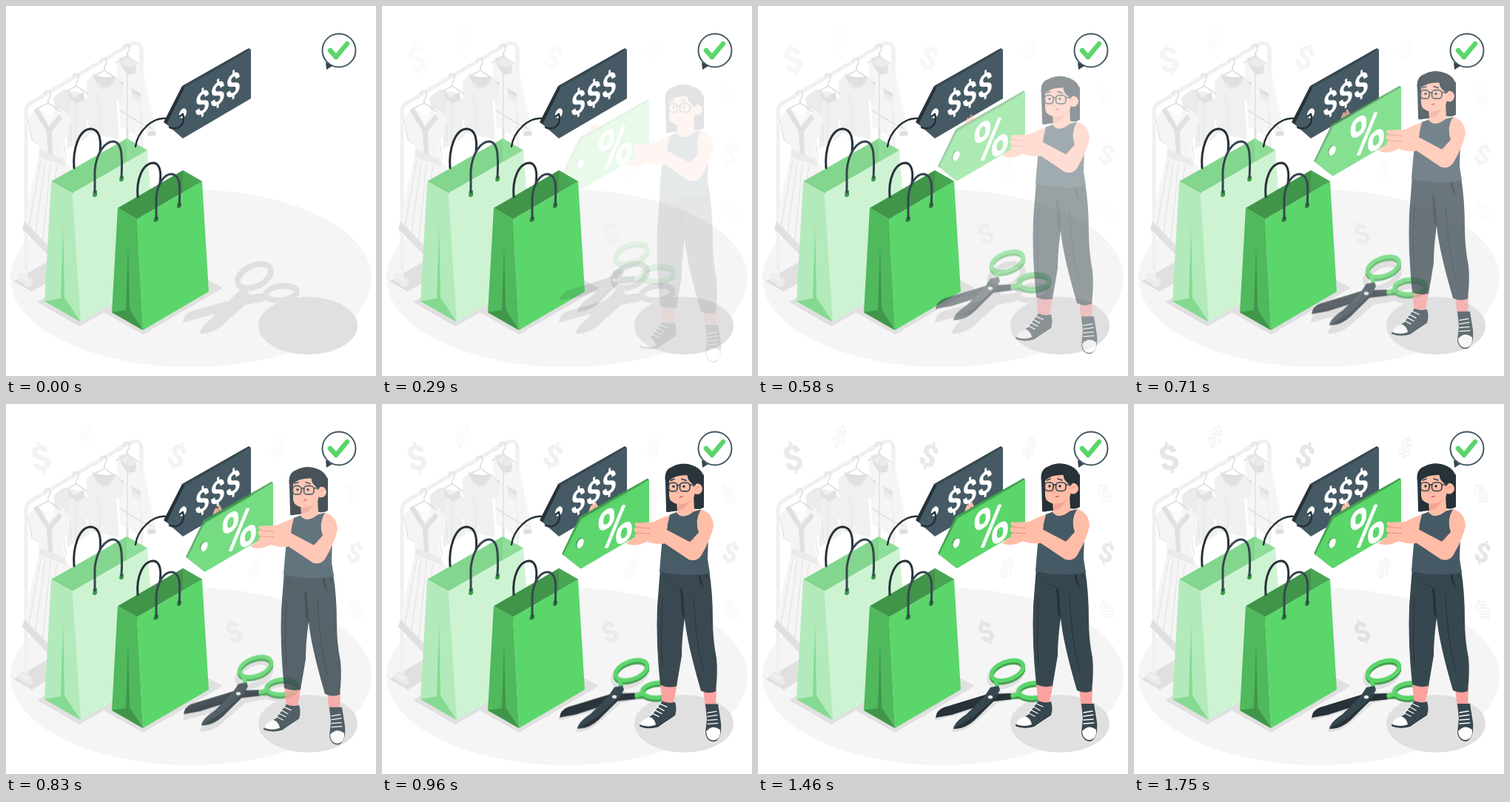
Write an HTML page that moves like this. It is 500x500 px and loops after 1.79 s.

```html
<!DOCTYPE html>
<html lang="en">
<head>
<meta charset="utf-8">
<title>Price drop</title>
<style>
html, body { margin: 0; width: 100%; height: 100%; overflow: hidden; background: #fff; }
svg { display: block; width: 100vw; height: 100vh; }
text { font-family: Roboto, Arial, sans-serif; font-weight: 700; text-anchor: middle; }

.ink { fill: #263238; }
.navy { fill: #37474f; }
.slate { fill: #455a64; }
.green { fill: #5bd66b; }
.skin { fill: #ffbda7; }
.white { fill: #fff; }
.g1 { fill: #fafafa; }
.g2 { fill: #f5f5f5; }
.g3 { fill: #ebebeb; }
.g4 { fill: #e0e0e0; }
.line { fill: none; stroke-linecap: round; stroke-linejoin: round; }
.cord { stroke: #263238; stroke-width: 3; }
.front { stroke: #37474f; stroke-width: 3; }
.thin { stroke: #263238; stroke-width: 1; }

#shopper, #scissors {
  --from: 30px;
  animation: slide 1500ms cubic-bezier(.36, -.01, .5, 1.38) both paused;
}
#scissors { --from: -30px; }
#coins { animation: fade 1790ms linear both paused; }
#coins text { font-weight: 900; }
@keyframes slide { from { opacity: 0; transform: translateY(var(--from)); } to { opacity: 1; transform: none; } }
@keyframes fade { from { opacity: 0; } to { opacity: 1; } }
</style>
</head>
<body>
<svg viewBox="0 0 500 500">
  <ellipse class="g2" cx="250" cy="368" rx="244" ry="120"/>

  <g id="rack">
    <path class="g4" d="M10 372L62 342V370L35 386Z"/>
    <path class="line" stroke="#e0e0e0" stroke-width="3" d="M164 66V182"/>
    <path class="line" stroke="#f0f0f0" stroke-width="5" d="M27 368V143Q27 134 35 130L166 53Q183 45 183 61V190"/>
    <path class="g3" d="M16 363L22 361L36 370V378L31 380L16 371Z"/>
    <path class="line" stroke="#f5f5f5" stroke-width="2" d="M18 364L31 372"/>

    <!-- jacket -->
    <path class="g2" d="M150 76L158 69L177 79L186 92L203 170L191 174L181 132V178L154 162Z"/>
    <path class="g3" d="M152 70L164 67L175 77L176 91L165 94L157 84Z"/>
    <path class="g4" d="M153 72Q164 90 176 80L174 92L163 92Z"/>
    <path class="g3" d="M147 97L159 104V111L147 104ZM170 111L182 118V131L170 124Z"/>
    <path class="g4" d="M170 111L182 118V123L170 117ZM147 97L159 104V107L147 101ZM191 171Q197 167 203 171L202 175L192 176Z"/>
    <path class="line" stroke="#e0e0e0" stroke-width="1.5" d="M155 142L180 157L198 166M164 80V182"/>

    <!-- tee -->
    <path fill="#f0f0f0" d="M109 101L120 91Q130 114 147 94L158 108L156 130L149 126L153 180L112 172Z"/>
    <path class="g4" d="M117 92Q131 98 147 95Q143 112 130 110Q121 104 117 92Z"/>
    <path class="line" stroke="#e6e6e6" stroke-width="1" d="M117 92Q122 113 133 112Q143 111 148 95M122 119Q130 143 126 170"/>

    <!-- blouse -->
    <path fill="#f0f0f0" d="M64 124L80 113L101 117L111 128L120 149L108 156L113 176L82 194L84 151L69 145Z"/>
    <path class="g3" d="M64 124L77 113L87 124L85 156L67 147Z"/>
    <path class="g4" d="M83 113L92 124L105 116L106 127L96 132L86 125Z"/>
    <path class="line" stroke="#e0e0e0" stroke-width="1" d="M94 130V185M86 151L88 182"/>

    <!-- dress -->
    <path class="g2" d="M29 151L43 138L58 151L72 137L88 151L83 177L77 182L78 206L88 220L70 330L55 336L22 302L44 202L45 188L34 181Z"/>
    <path class="g3" d="M45 194L80 207V217L45 204Z"/>
    <path class="g4" d="M37 141L43 137L58 163L72 147L76 152L62 169L63 201L57 199L55 169ZM22 301L25 291L58 325L56 336Z"/>
    <path class="line" stroke="#e6e6e6" stroke-width="1.5" d="M30 154L35 181L44 187M47 209L31 297M53 211L40 306M60 213L50 315M78 183L81 205M69 216L60 270"/>
    <path class="g1" d="M50 145L57 159L67 146Z"/>

    <g class="line" stroke="#e0e0e0" stroke-width="1.7">
      <path id="hanger" d="M52 119Q53 113 58 115Q63 119 57 126V131L42 139M57 131L73 142"/>
      <use href="#hanger" x="38" y="-23"/>
      <use href="#hanger" x="76" y="-44"/>
      <use href="#hanger" x="107" y="-63"/>
    </g>
  </g>

  <g id="light-bag">
    <path class="g4" d="M42 400L60 390L199 366L208 371L99 433Z"/>
    <path fill="#83d68d" d="M61 237L163 179L191 195L90 253Z"/>
    <path fill="#8edd98" d="M163 179L191 195L163 211Z"/>
    <path class="line cord" d="M92 219C90 195 98 166 115 166C126 167 129 180 127 197"/>
    <path fill="#cef3d3" d="M90 253L191 195L204 368L101 427Z"/>
    <path fill="#b3eabb" d="M61 237L90 253L101 427L52 399Z"/>
    <path fill="#85da91" d="M52 399L79 394L101 427ZM77 295L74 395L79 394Z"/>
    <path fill="#3d9a49" d="M118 249H123V256Q121 260 117 257ZM154 230H159V235Q157 239 153 236Z"/>
    <path class="line front" d="M120 252V222C122 200 133 183 145 183C155 184 158 195 156 232"/>
  </g>

  <g id="green-bag">
    <path class="g4" d="M132 414L150 403L271 369L293 381L185 444Z"/>
    <path fill="#409549" d="M151 273L239 222L265 237L177 288Z"/>
    <path fill="#48a653" d="M239 222L265 237L239 252Z"/>
    <path class="line cord" d="M178 258C176 235 184 212 200 212C209 214 210 225 208 240"/>
    <path class="green" d="M177 288L265 237L274 386L185 438Z"/>
    <path fill="#4fb95c" d="M151 273L177 288L185 438L143 414Z"/>
    <path fill="#409549" d="M143 414L167 410L185 438ZM165 323L162 411L167 410Z"/>
    <path fill="#2f7a39" d="M201 285H206V289Q204 293 199 291ZM232 266H237V270Q235 275 231 272Z"/>
    <path class="line front" d="M203 287V260C204 242 213 227 224 227C235 229 236 240 234 269"/>
  </g>

  <g id="price-tag">
    <path class="navy" d="M238 108L328 57L331 59L240 114Z"/>
    <path class="slate" d="M216 159L240 111L331 59V125L239 179Z"/>
    <path class="ink" d="M213 157L238 108L241 111L217 160Z"/>
    <ellipse class="white" cx="239" cy="145" rx="4.5" ry="7" transform="rotate(25 239 145)"/>
    <path class="line" stroke="#263238" stroke-width="2.5" d="M175 190C178 169 198 150 217 152M221 164C233 169 243 160 239 146L235 149"/>
    <text class="white" font-size="42" transform="matrix(.866 -.5 0 1 286 118.5)" y="15">$$$</text>
  </g>

  <g id="bubble">
    <path class="navy" d="M432 76L433 86L443 80Z"/>
    <circle class="white" cx="450" cy="60" r="22.5" stroke="#455a64" stroke-width="2"/>
    <path class="line" stroke="#5bd66b" stroke-width="6.5" d="M438 60L446 69L461 51"/>
  </g>

  <g id="coins"></g>

  <g id="shadows">
    <ellipse class="g4" cx="408" cy="432" rx="67" ry="39"/>
    <path class="g4" d="M239 428Q240 416 251 412L302 398L322 378L329 390L357 387L350 399L323 404L288 435Q274 444 262 443Q263 433 280 420L283 416Z"/>
    <g class="line" stroke="#e0e0e0" stroke-width="8">
      <ellipse cx="335.500" cy="365" rx="24" ry="14" transform="rotate(-26 335.500 365)"/>
      <ellipse cx="372" cy="388" rx="21" ry="9.500" transform="rotate(-7 372 388)"/>
    </g>
  </g>

  <g id="scissors">
    <path class="ink" d="M240 424Q241 414 251 410L310 392L342 391L344 399L318 402L262 420Z"/>
    <g class="line" stroke-width="5.5">
      <g stroke="#43a04f">
        <ellipse cx="337" cy="363" rx="22.500" ry="12" transform="rotate(-20 337 363)"/>
        <ellipse cx="373" cy="390" rx="21" ry="10" transform="rotate(-5 373 390)"/>
        <path d="M344 396L355 396"/>
      </g>
      <g stroke="#5bd66b">
        <ellipse cx="337" cy="360" rx="22.500" ry="12" transform="rotate(-20 337 360)"/>
        <ellipse cx="373" cy="387" rx="21" ry="10" transform="rotate(-5 373 387)"/>
        <path d="M344 394L354 391M323 381L321 373"/>
      </g>
    </g>
    <path class="navy" d="M264 439Q265 430 282 419L306 395L314 383L325 381L327 386L320 400L293 426Q279 438 264 439Z"/>
    <path class="ink" d="M264 439L291 423L320 397L320 400L293 427Q279 440 264 439Z"/>
    <ellipse cx="314" cy="396" rx="3.200" ry="2.300" fill="#ebebeb"/>
  </g>

  <g id="shopper">
    <!-- legs and shoes -->
    <path fill="#fba29f" d="M376 377H399L393 407L379 406ZM434 384H452L451 411L437 411Z"/>
    <path class="navy" d="M379 401Q388 405 396 402Q399 412 396 420Q384 428 373 436Q359 440 348 435Q348 429 365 420Z"/>
    <path class="white" d="M349 433Q349 427 361 422Q369 425 370 433Q360 437 349 433Z"/>
    <path class="line" stroke="#fff" stroke-width="1.3" d="M364 417L374 422M368 413L378 418M372 409L381 414M376 405L385 409"/>
    <path class="line thin" d="M349 435Q361 439 373 435L396 420"/>
    <path class="navy" d="M437 405H454L458 430Q460 452 449 456Q439 456 437 444L439 425Z"/>
    <path class="white" d="M438 442Q447 432 457 440Q458 453 448 454Q439 454 438 442Z"/>
    <path class="line" stroke="#fff" stroke-width="1.3" d="M440 417L452 415M440 422L453 420M440 427L453 426M440 432L454 431"/>
    <path class="navy" d="M376 222L442 224Q447 254 447 292Q447 318 452 343Q454 362 451 388Q441 392 431 387Q412 322 409 289Q405 318 405 340L398 381Q386 384 376 379Q370 323 372 273Z"/>
    <path class="ink" d="M381 234Q389 245 403 247L405 282L409 292Q408 260 406 249Q391 245 381 234ZM428 230Q428 242 435 250L430 230Z"/>
    <path class="line thin" d="M421 260Q423 315 434 360M379 262Q376 315 379 354M437 228L440 236"/>

    <!-- far arm and hair -->
    <path class="skin" d="M394 148Q377 153 365 160L342 177L330 188Q339 192 349 189L387 174Z"/>
    <path class="ink" d="M385 95L435 95L435 139Q429 143 422 141L390 145Q387 146 384 145Z"/>
    <path class="skin" d="M398 128L421 121L422 142L431 144L418 158L401 155L391 149L399 144Z"/>

    <!-- top -->
    <path class="slate" d="M389 149L398 146Q406 157 421 145L431 142Q429 159 441 179L440 209L443 228Q412 234 375 226Q377 200 379 180Q386 172 386 162Z"/>
    <path class="line thin" opacity=".35" d="M381 186Q390 192 395 200M421 211L430 220"/>

    <!-- head -->
    <path class="skin" d="M387 99Q387 91 399 89L421 95L424 110Q424 129 413 134Q399 138 390 130Q386 123 387 99Z"/>
    <path fill="#f2a38f" d="M401 135Q413 135 419 128L408 141L399 144Z"/>
    <path class="ink" d="M383 105Q380 88 393 84Q407 77 421 83Q434 88 435 101V139Q428 143 422 140L423 118L420 108Q412 102 413 96Q397 95 388 103L388 145Q385 146 384 141Z"/>
    <path class="skin" d="M421 112Q425 104 431 109Q436 116 429 121Q423 123 421 118Z"/>
    <path class="line" stroke="#e98f7c" d="M424 114L429 111M400 112L398 119L401 120"/>
    <g class="line" stroke="#37474f" stroke-width="1.700">
      <rect x="387.500" y="106" width="11.500" height="11.500" rx="4.500"/>
      <rect x="402.500" y="106" width="13.500" height="11.500" rx="4.500"/>
      <path d="M399 110Q401 108 403 110M416 109L423 109M390 103L395 101M405 101L411 103"/>
    </g>
    <circle class="ink" cx="394" cy="111" r="1.700"/>
    <circle class="ink" cx="408" cy="111" r="1.700"/>
    <path fill="#d7656d" d="M401 126Q404 123 407 124Q406 127 401 126Z"/>

    <!-- discount tag -->
    <path class="skin" d="M278 150Q281 138 283 136Q286 135 287 139Q285 131 289 132L294 142L296 153Z"/>
    <path class="line" stroke="#e98f7c" d="M287 139L289 146"/>
    <path fill="#43a04f" d="M243 202L267 152L359 100L361 102L271 157L246 204Z"/>
    <path class="green" d="M245 203L269 155L361 102V168L269 222Z"/>
    <path fill="#43a04f" d="M243 202L245 203L269 222L267 221Z"/>
    <ellipse cx="267" cy="187.500" rx="4.700" ry="7.500" fill="#43a04f" transform="rotate(25 267 187.500)"/>
    <ellipse class="white" cx="268" cy="188" rx="4" ry="7" transform="rotate(25 268 188)"/>
    <text class="white" font-size="80" transform="matrix(.866 -.5 0 1 315 165)" y="28">%</text>

    <!-- near arm -->
    <path class="skin" d="M431 142Q447 146 448 165Q444 183 431 205Q425 213 415 210L382 188Q370 190 357 185L343 180Q339 177 344 175L341 171Q339 167 344 166L341 162Q341 159 347 160L366 159Q376 161 382 168L416 186L428 173Q422 157 431 142Z"/>
    <path class="line" stroke="#e98f7c" d="M344 166L362 168M344 174L362 175M416 186L421 182"/>
  </g>
</svg>
<script>
const LOOP = 1790, FRAME = 1000 / 24;

// x, y, font size, tilt, fill, outline
const coins = [
  [47, 73, 47, -13, '#e6e6e6'], [231, 70, 42, 20, '#e6e6e6'],
  [308, 308, 36, -22, '#e0e0e0'], [471, 201, 36, 18, '#e6e6e6'],
  [110, 44, 32, 18, '#fff', '#ebebeb'], [367, 59, 29, 15, '#fff', '#ebebeb'],
  [337, 222, 29, 18, '#fff', '#ebebeb'], [469, 121, 29, -28, '#fff', '#ebebeb'],
  [472, 278, 29, -28, '#fff', '#ebebeb'],
];
document.getElementById('coins').innerHTML = coins.map(([x, y, size, tilt, fill, outline = 'none']) =>
  `<text transform="translate(${x} ${y}) rotate(${tilt})" y="${size * .35}" font-size="${size}" fill="${fill}" stroke="${outline}">$</text>`
).join('');

// Seek the paused keyframes in steps of 24 per second.
const clips = document.getAnimations();
const start = performance.now();
function draw() {
  const time = (performance.now() - start) % LOOP;
  const step = Math.floor(time / FRAME) + 1;
  for (const clip of clips) clip.currentTime = step * FRAME;
  requestAnimationFrame(draw);
}
draw();
</script>
</body>
</html>
```
